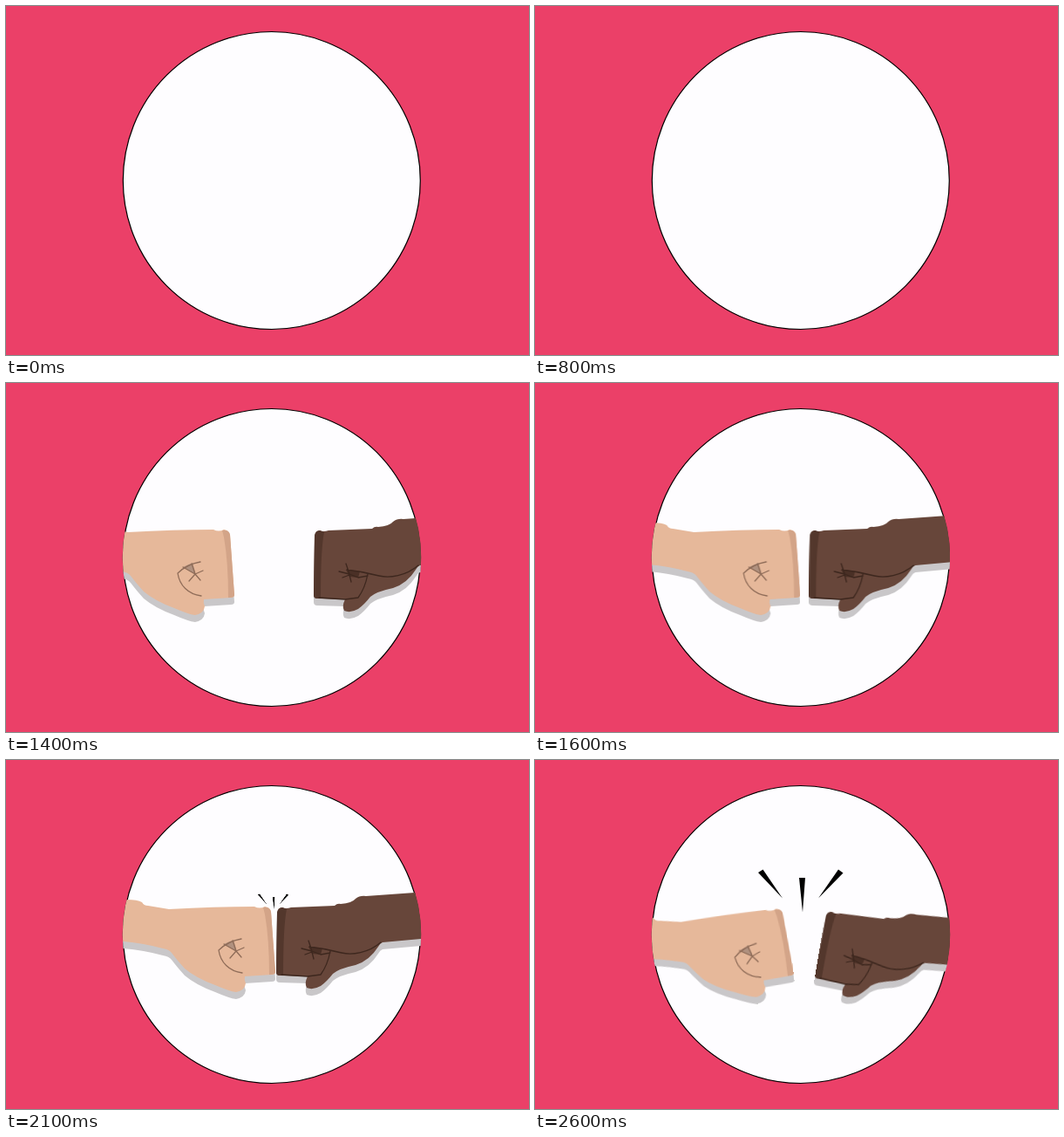
Animation of 600 by 400 pixels, one loop 3 s. Source, as an HTML page without scripts:

```html
<!DOCTYPE html>
<html lang="en">
<head>
<meta charset="utf-8">
<title>Fist bump</title>
<style>
  html, body { margin: 0; width: 100%; height: 100%; overflow: hidden; background: #eb4068; }
  svg { display: block; width: 100vw; height: 100vh; }

  .hand, .sparks { animation: bump 3s step-end infinite; }
  .left  { --far: -47px; --kick: -12px; --drop: 1px; --tilt: -6.3deg; transform-origin: 307px 246px; }
  .right { --far: 43px;  --kick: 11px;  --drop: 3px; --tilt: 9.5deg;  transform-origin: 310px 246px; }
  .sparks { animation-name: burst; transform-origin: 307.5px 169px; }

  .shadow { fill: #c9c7c9; }
  .light { fill: #e6b89a; }
  .light-edge { fill: #d3a488; }
  .light-fold { fill: #b0917f; }
  .dark { fill: #67463a; }
  .dark-edge { fill: #53372c; }
  .dark-fold { fill: #4a3026; }
  .crease { fill: none; stroke-width: 1.3; stroke-linecap: round; stroke-linejoin: round; }
  .left .crease { stroke: #8f6c58; }
  .right .crease { stroke: #3d271e; }

  /* slide in, touch, recoil; poses held for 100 ms */
  @keyframes bump {
    0%     { transform: translateX(calc(var(--far) * 6)); }
    43.33% { transform: translateX(calc(var(--far) * 2.4)); }
    46.66% { transform: translateX(var(--far)); }
    50%    { transform: translateX(calc(var(--far) * .37)); }
    53.33% { transform: translateX(calc(var(--far) * .1)); }
    56.66% { transform: translateX(calc(var(--far) * .02)); }
    60%    { transform: none; }
    73.33% { transform: translate(calc(var(--kick) * .7), calc(var(--drop) * .7)) rotate(calc(var(--tilt) * .7)); }
    76.66% { transform: translate(calc(var(--kick) * .93), calc(var(--drop) * .93)) rotate(calc(var(--tilt) * .95)); }
    80%    { transform: translate(calc(var(--kick) * .98), var(--drop)) rotate(calc(var(--tilt) * .98)); }
    86.66%, 100% { transform: translate(var(--kick), var(--drop)) rotate(var(--tilt)); }
  }
  @keyframes burst {
    0%     { transform: scale(0); }
    70%    { transform: scale(.36); }
    73.33% { transform: scale(.78); }
    76.66% { transform: scale(.98); }
    86.66%, 100% { transform: scale(1); }
  }
</style>
</head>
<body>
<svg viewBox="0 0 600 400">
  <defs>
    <clipPath id="disc"><circle cx="305" cy="200" r="171.3"/></clipPath>
    <path id="light-hand" d="M90 157L138 160Q151 160 156 163Q158 167 163 167L187 171Q240 168 285 168Q291 171 297 168Q303 169 304 174L309 243Q309 246 305 246L274 248Q273 252 275 256Q274 264 264 266Q256 265 240 258Q218 250 205 239Q196 229 190 221Q187 217 180 216Q158 210 135 208L90 204Z"/>
    <path id="dark-hand" d="M311 175Q312 169 317 169Q321 171 327 169L377 167Q380 164 384 165Q397 164 401 159Q406 155 413 156L469 152L530 147V200L476 205L432 209Q429 210 427 214Q417 230 401 235Q382 239 375 245Q368 254 361 259Q352 264 345 261Q342 256 346 248L314 247Q310 247 310 243Z"/>
  </defs>
  <rect width="600" height="400" fill="#eb4068"/>
  <circle cx="304.8" cy="200" r="170.5" fill="#fefdff" stroke="#000" stroke-width="1.2"/>

  <g clip-path="url(#disc)">
    <g class="hand left">
      <use href="#light-hand" class="shadow" y="8"/>
      <use href="#light-hand" class="light"/>
      <path class="light-edge" d="M295 169Q303 168 304 174L309 243Q309 246 302 246Q302 205 297 177Z"/>
      <path class="light-fold" d="M250 211L261 206L265 220Z"/>
      <path class="crease" d="M270 205C259 207 250 212 244 218C246 232 256 242 271 244M250 211L264 219L273 215M260 207L264 219L270 226M264 219L257 227"/>
    </g>
    <g class="hand right">
      <use href="#dark-hand" class="shadow" y="8"/>
      <use href="#dark-hand" class="dark"/>
      <path class="dark-edge" d="M311 175Q312 169 317 169L322 171Q318 190 318 247L314 247Q310 247 310 243Z"/>
      <path class="dark-fold" d="M347 214L363 216L361 223L351 222Z"/>
      <path class="crease" d="M430 209C416 221 397 224 385 221Q366 216 348 214M372 219Q369 235 361 246L346 248L316 246M339 216L351 219L347 207M343 223L351 220L353 228M351 219L361 223L372 221"/>
    </g>
  </g>

  <g class="sparks">
    <path d="M256 129L261.500 125.500L284 158.500ZM303 135H310L307 174.500ZM348 125.500L353.500 129.500L325 158.500Z"/>
  </g>
</svg>
</body>
</html>
```
